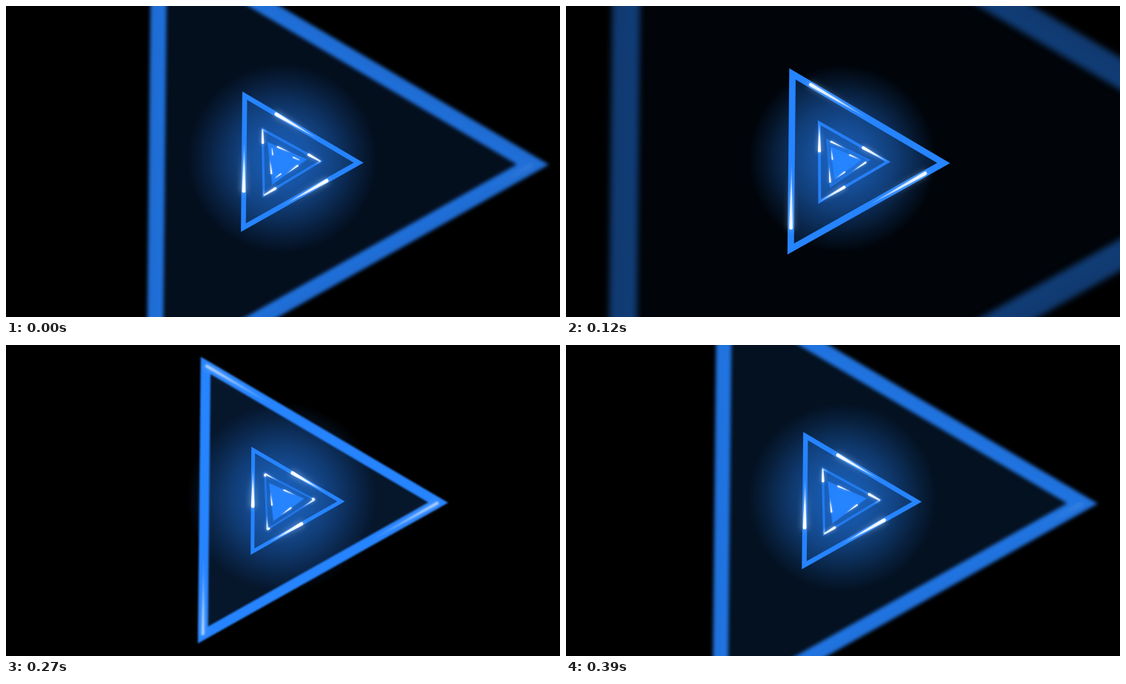
Write an HTML page with a canvas that moves like this. It is 750 px wide and 422 px high and loops after 0.42 s.

```html
<!DOCTYPE html>
<html lang="en">
<head>
<meta charset="utf-8">
<title>Triangle tunnel</title>
<style>
  html, body { margin: 0; width: 100%; height: 100%; overflow: hidden; background: #000; }
  canvas { display: block; }
</style>
</head>
<body>
<canvas id="stage" width="750" height="422"></canvas>
<script>
const ctx = document.getElementById('stage').getContext('2d');
const BLUE = '38,132,255';
const STEP_MS = 30, STEPS = 14;
const STEPS_PER_CYCLE = 13.35;   // steps until a triangle takes the place of the next larger one
const STREAK_LENGTH = 0.37;      // as a share of one side

const clamp = (x, lo = 0, hi = 1) => Math.min(hi, Math.max(lo, x));
const blue = alpha => `rgba(${BLUE},${alpha})`;

// Distance from centre to tip; age 0, 1, 2 are successive triangles of the tunnel.
function radiusAt(age) {
  const depth = 0.01818 - 0.010475 * age + 0.001385 * age ** 2
    + 0.0002 * age * (age - 1) * (age - 2);
  return 1 / depth;
}

function drawGlow() {
  const glow = ctx.createRadialGradient(374, 207, 0, 374, 207, 129);
  [[0, 0.62], [0.3, 0.5], [0.55, 0.34], [0.8, 0.14], [1, 0]]
    .forEach(([at, alpha]) => glow.addColorStop(at, blue(alpha)));
  ctx.fillStyle = glow;
  ctx.fillRect(0, 0, 750, 422);
}

// A tapered light running down the left side; head is its position along that side.
function drawStreak(radius, head) {
  const tail = head - STREAK_LENGTH;
  const from = Math.max(tail, 0.03), to = Math.min(head, 0.97);
  if (from >= to) return;
  const x = -0.47 * radius;
  const yAt = s => (s - 0.5) * Math.sqrt(3) * radius;
  const halfAt = s => Math.min(0.065 * radius, 4.8) / 2 * (s - tail) / STREAK_LENGTH;
  const a = halfAt(from), b = halfAt(to);

  const light = ctx.createLinearGradient(0, yAt(tail), 0, yAt(head));
  light.addColorStop(0, 'rgba(255,255,255,0)');
  light.addColorStop(0.55, 'rgba(255,255,255,0.85)');
  light.addColorStop(1, '#fff');
  ctx.fillStyle = light;
  ctx.beginPath();
  ctx.moveTo(x - a, yAt(from));
  ctx.lineTo(x + a, yAt(from));
  ctx.lineTo(x + b, yAt(to));
  if (head < 0.97) ctx.arc(x, yAt(to), b, 0, Math.PI);
  ctx.lineTo(x - b, yAt(to));
  ctx.fill();
}

function drawTriangle(age) {
  const radius = radiusAt(age);
  const fade = clamp(1 - 1.3 * (age - 1.87));
  const blur = 4.5 * (age - 1.4);
  const fillAlpha = 0.17 + clamp((-age - 0.5) * 1.5, 0, 0.83);

  ctx.save();
  ctx.translate(374, 211.7);
  ctx.rotate(0.01 - 0.03 * (1 - clamp(age, -1, 1)) ** 2);
  if (blur > 0) ctx.filter = `blur(${blur}px)`;

  ctx.beginPath();
  for (let corner = 0; corner < 3; corner++) {
    const angle = corner * Math.PI * 2 / 3;
    ctx.lineTo(0.94 * radius * Math.cos(angle), 0.94 * radius * Math.sin(angle));
  }
  ctx.closePath();
  ctx.fillStyle = blue(fillAlpha * fade ** 2);
  ctx.fill();
  ctx.lineWidth = 0.06 * radius;
  ctx.strokeStyle = blue(clamp(0.8 + 0.4 * age, 0.55) * fade);
  ctx.stroke();

  if (age >= -2) {
    const head = 0.22 + 0.49 * age;
    ctx.globalAlpha = clamp(1.9 - 0.75 * age) * fade;
    ctx.shadowColor = 'rgba(190,220,255,0.8)';
    ctx.shadowBlur = Math.min(8, 0.1 * radius);
    for (let side = 0; side < 3; side++) {
      drawStreak(radius, head);
      drawStreak(radius, head + 1);
      ctx.rotate(Math.PI * 2 / 3);
    }
  }
  ctx.restore();
}

function draw() {
  const step = Math.floor(performance.now() / STEP_MS) % STEPS;
  const phase = step / STEPS_PER_CYCLE;
  ctx.fillStyle = '#000';
  ctx.fillRect(0, 0, 750, 422);
  drawGlow();
  for (let level = 2; level >= -4; level--) {
    const age = level + phase;
    if (age < 2.6) drawTriangle(age);
  }
  requestAnimationFrame(draw);
}
draw();
</script>
</body>
</html>
```
